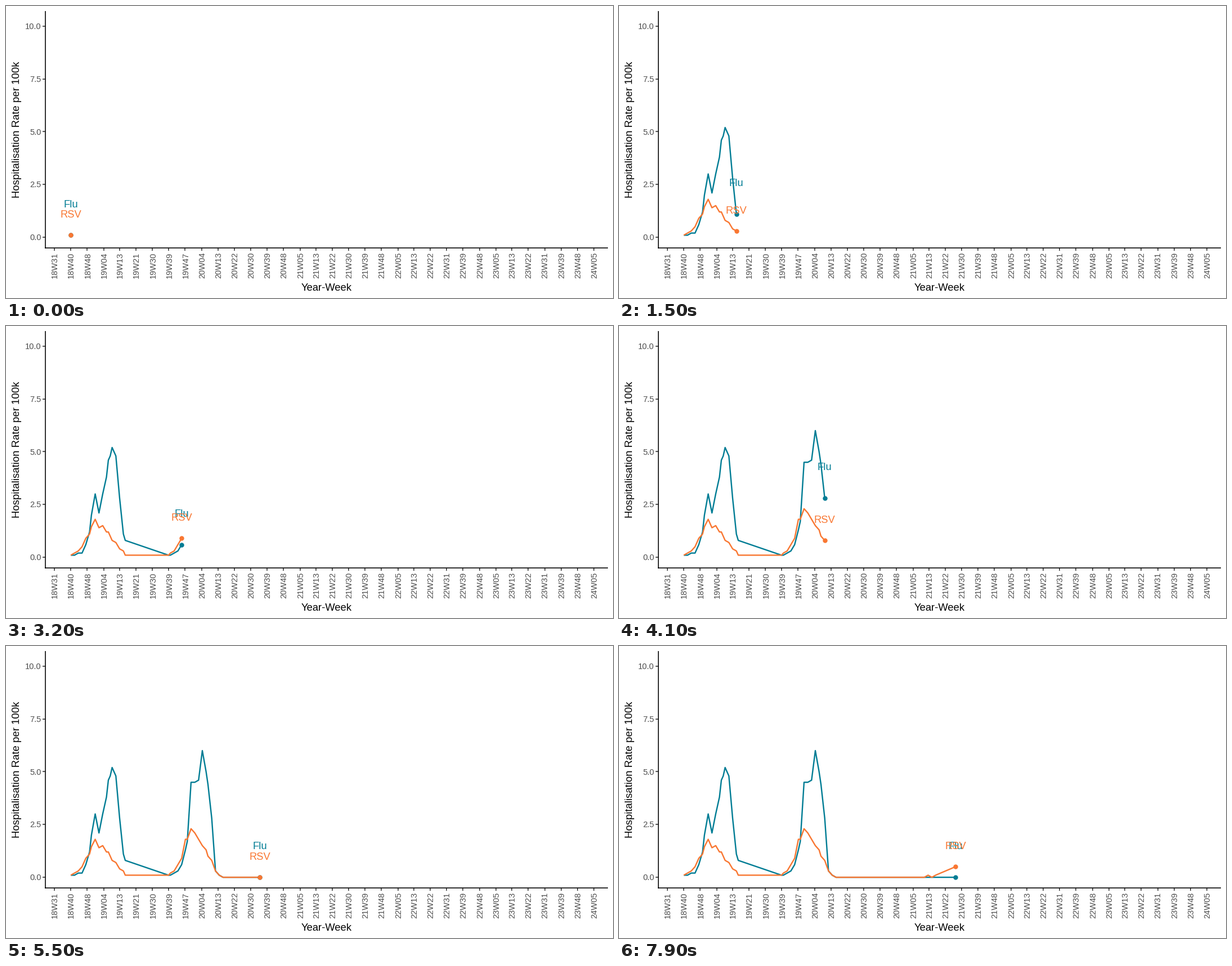
Animation of 1079x519 px, one loop 8000 ms. Source, as a matplotlib script:

```python
import matplotlib.pyplot as plt
import numpy as np
from matplotlib.animation import FuncAnimation

W, H, DPI = 1079, 519, 100
PT = 72 / DPI                      # points per pixel
FRAMES, STEP_MS = 80, 100
WEEKS_PER_FRAME = 1.8255
TEAL, ORANGE = "#007C94", "#F97732"

plt.rcParams["font.family"] = "Liberation Sans"


def day_x(days):
    """Pixel x of a day counted from 1 August 2018."""
    return 86.0 + 0.4773 * days


def week_x(weeks):
    """Pixel x of a week counted from 1 October 2018."""
    return day_x(61 + 7 * weeks)


def rate_y(rate):
    return 411.1 - 37.53 * rate


def season(first, last, flu, rsv):
    """Rows of (frame, week, flu, rsv): the latest week reached in each frame."""
    frames = np.arange(round(first / WEEKS_PER_FRAME),
                       round(last / WEEKS_PER_FRAME) + 1)
    weeks = np.minimum(np.floor((frames + 0.5) * WEEKS_PER_FRAME), last)
    return np.column_stack([frames, weeks, flu, rsv])


rows = np.vstack([
    season(0, 29,
           [.1, .1, .2, .2, .6, 1.2, 2, 3, 2.1, 3, 3.8, 4.6, 5.2, 4.8, 2.8, 1.1, .8],
           [.1, .2, .3, .5, .9, 1.1, 1.45, 1.8, 1.4, 1.5, 1.2, 1.2, .8, .7, .4, .3, .1]),
    season(52, 83,
           [.1, .1, .2, .3, .6, 1.3, 1.7, 4.5, 4.5, 4.6, 6, 5, 4.4, 2.8, .3, .1, 0, 0],
           [.1, .2, .3, .6, .9, 1.8, 1.8, 2.3, 2.1, 1.8, 1.5, 1.3, 1, .8, .3, .1, 0, 0]),
    season(104, 134, [0] * 17, [0] * 14 + [.1, 0, .1]),
    [[86, 157, 0, .97]],
])
# the first peak is passed between two frames
rows[12, 0] = 12.5
rows = np.insert(rows, 12, [12, 21, 4.8, 1.0], axis=0)
knots, weeks, flu, rsv = rows.T

fig = plt.figure(figsize=(W / DPI, H / DPI), dpi=DPI, facecolor="white")
ax = fig.add_axes([0, 0, 1, 1])
ax.set_xlim(0, W)
ax.set_ylim(H, 0)
ax.axis("off")


def stroke(xs, ys, color, px, z=1, **kw):
    return ax.plot(xs, ys, color=color, lw=px * PT, zorder=z,
                   solid_capstyle="butt", **kw)[0]


def write(x, y, text, px, color, ha="center", angle=0, z=1):
    return ax.text(x, y, text, fontsize=px * PT, color=color, ha=ha,
                   va="baseline", rotation=angle, rotation_mode="anchor",
                   zorder=z)


def week_label(date):
    """Year and week number, weeks starting on Monday."""
    day = date.astype("datetime64[D]")
    yday = int((day - date.astype("datetime64[Y]").astype("datetime64[D]")).astype(int))
    weekday = (int(day.astype(int)) + 3) % 7
    return f"{str(date)[2:4]}W{(yday + 7 - weekday) // 7:02d}"


def draw_axes():
    for rate in (0, 2.5, 5, 7.5, 10):
        y = rate_y(rate)
        stroke([65.4, 70], [y, y], "#333333", 1.6)
        write(62.7, y + 5.2, f"{rate:.1f}", 14.67, "#4D4D4D", "right")

    start = np.datetime64("2018-08")
    for i in range(34):
        date = start + 2 * i
        days = (date.astype("datetime64[D]") - start.astype("datetime64[D]")).astype(int)
        x = day_x(days)
        stroke([x, x], [430, 434.6], "#333333", 1.6)
        write(x + 5.2, 438, week_label(date), 14.67, "#4D4D4D", "right", 90)

    stroke([70, 70], [9.2, 430.8], "black", 1.6)
    stroke([69.2, 1069.5], [430, 430], "black", 1.6)
    write(569.8, 506.4, "Year-Week", 18.33, "black")
    write(24.3, 219.5, "Hospitalisation Rate per 100k", 18.6, "black", angle=90)


class Series:
    def __init__(self, name, rates, color, lift, z):
        self.rates, self.lift = rates, lift
        self.line = stroke([], [], color, 2.4, 2 + z, solid_joinstyle="round")
        self.dot = ax.plot([], [], "o", color=color, ms=8.4 * PT, mew=0,
                           zorder=3 + z)[0]
        self.label = write(0, 0, name, 18.4, color, z=4 + z)

    def show(self, frame):
        past = knots < frame
        x = week_x(np.interp(frame, knots, weeks))
        rate = np.interp(frame, knots, self.rates)
        self.line.set_data(np.append(week_x(weeks[past]), x),
                           rate_y(np.append(self.rates[past], rate)))
        self.dot.set_data([x], [rate_y(rate)])
        self.label.set_position((x, rate_y(rate + self.lift) + 6.6))
        return self.line, self.dot, self.label


draw_axes()
series = [Series("Flu", flu, TEAL, 1.5, 0), Series("RSV", rsv, ORANGE, 1.0, 0.5)]


def update(frame):
    return [artist for s in series for artist in s.show(frame)]


anim = FuncAnimation(fig, update, frames=FRAMES, interval=STEP_MS,
                     init_func=lambda: update(0), repeat=True,
                     repeat_delay=0, blit=False)
plt.show()
```
